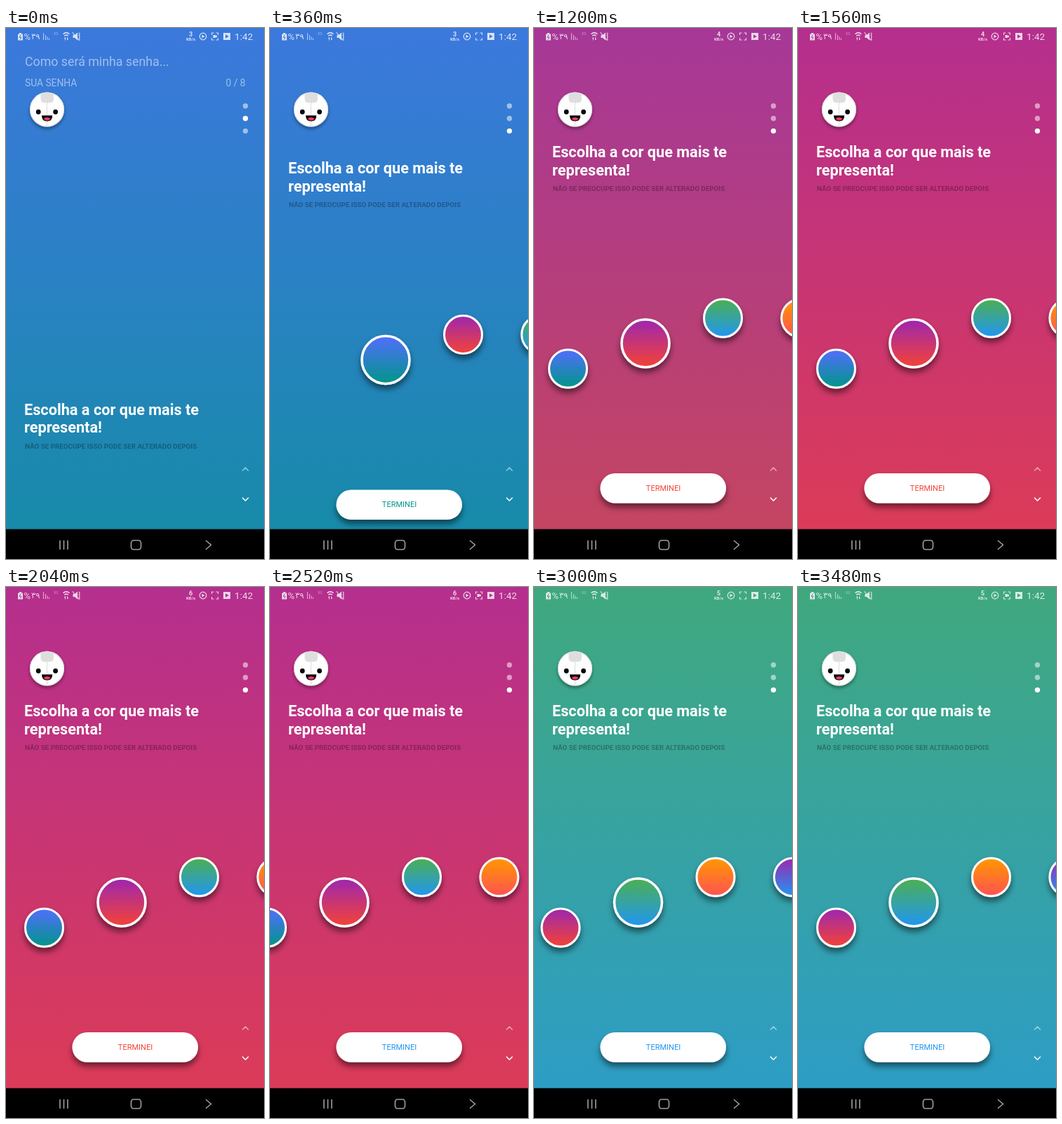
These frames come from a looping animation (368x756 px, 3600 ms). An HTML page:

```html
<!DOCTYPE html>
<html lang="pt-BR">
<head>
<meta charset="utf-8">
<title>Escolha de cor</title>
<style>
  html, body { margin: 0; width: 100%; height: 100%; overflow: hidden; background: #000; }
  svg { display: block; width: 368px; height: 756px; font-family: Roboto, "Noto Sans", sans-serif; }
  .title { font-size: 21.7px; font-weight: 700; }
  .note { font-size: 9.8px; font-weight: 700; fill: #000; fill-opacity: .3; }
  .line { fill: none; stroke-linecap: round; stroke-linejoin: round; }
</style>
</head>
<body>
<svg viewBox="0 0 368 756" fill="#fff">
  <defs id="defs">
    <filter id="shadow" filterUnits="userSpaceOnUse" x="-150" y="0" width="800" height="1200">
      <feDropShadow dx="0" dy="6" stdDeviation="4.2" flood-color="#000" flood-opacity=".5"/>
    </filter>
    <filter id="softShadow" x="-30%" y="-30%" width="160%" height="170%">
      <feDropShadow dx="0" dy="3" stdDeviation="2.6" flood-color="#000" flood-opacity=".4"/>
    </filter>
  </defs>

  <g id="backdrops"></g>

  <g id="page">
    <g transform="translate(0 -366.5)" fill-opacity=".52">
      <text x="27" y="54" font-size="17.8">Como será minha senha...</text>
      <g font-size="13.8">
        <text x="27" y="83">SUA SENHA</text>
        <text x="341.5" y="83" text-anchor="end">0 / 8</text>
      </g>
    </g>
    <text class="title" x="26" y="184">Escolha a cor que mais te</text>
    <text class="title" x="26" y="209.5">representa!</text>
    <text class="note" x="27" y="232">NÃO SE PREOCUPE ISSO PODE SER ALTERADO DEPOIS</text>
    <g id="swatches" filter="url(#shadow)" stroke="#fff"></g>
    <rect x="94.5" y="634" width="179.5" height="42.5" rx="21.25" filter="url(#shadow)"/>
    <text id="button" x="184.5" y="659" font-size="11" text-anchor="middle">TERMINEI</text>
  </g>

  <!-- avatar -->
  <g>
    <circle cx="58.5" cy="116" r="24.5" filter="url(#softShadow)"/>
    <circle cx="58.5" cy="116" r="23.8" fill="none" stroke="#e4e4e4" stroke-width="1.2"/>
    <path d="M58.5 93V139" stroke="#ddd" stroke-width="1"/>
    <path d="M49.5 94.5Q58.5 89.5 68 94.5V101Q68 106.5 62.5 106.5H55Q49.5 106.5 49.5 101Z" fill="#dedede"/>
    <g fill="#050505">
      <circle cx="46.2" cy="119.5" r="3.4"/>
      <circle cx="70.6" cy="119.5" r="3.4"/>
      <path d="M51 124.5H66.2Q66.2 132.8 58.6 132.8Q51 132.8 51 124.5Z"/>
    </g>
    <path d="M53.5 129Q58.6 125.6 63.8 129Q62.2 131.7 58.6 131.7Q55 131.7 53.5 129Z" fill="#f0386b"/>
  </g>

  <g id="dots"></g>
  <g class="line" stroke="#fff" stroke-width="1.6" stroke-linecap="square">
    <path d="M337.5 630L341.5 626L345.5 630" opacity=".52"/>
    <path d="M337.5 669L341.5 673L345.5 669"/>
  </g>

  <!-- status bar -->
  <g opacity=".8">
    <path d="M17 8.5H19V7H22V8.5H24V17.5H17Z"/>
    <path d="M21 10L19 13.3H22L20.3 16" class="line" stroke="#666f99" stroke-width="1"/>
    <text x="25.5" y="16.5" font-size="13">%</text>
    <text x="36" y="16" font-size="11.5" font-family="DejaVu Sans, sans-serif" direction="ltr">٣٩</text>
    <path d="M53.5 7V17M56.5 10V17M59 12.5V17M61.5 14.5V17" stroke="#fff" stroke-width="1.1" opacity=".75"/>
    <text x="67.5" y="10" font-size="6" opacity=".55">3G</text>
    <g class="line" stroke="#fff" stroke-width="1.5">
      <path d="M82 8.3Q86 5 90 8.3M83.7 10.8Q86 9 88.3 10.8"/>
      <path d="M84.5 17V13.5L83.4 14.8M87.5 13.5V17L88.6 15.7" stroke-width="1"/>
    </g>
    <path d="M95.5 10H98L102 6.5V17.5L98 14H95.5Z"/>
    <path d="M95 6.5L104 17.5M104 7L105.3 9L104 11L105.3 13L104 15L105.3 17" class="line" stroke="#fff" stroke-width="1.1"/>
    <g text-anchor="middle" font-weight="700">
      <text id="speed" x="263.5" y="11.8" font-size="9"></text>
      <text x="263.5" y="17.8" font-size="6">KB/s</text>
    </g>
    <circle cx="281" cy="12" r="4.8" class="line" stroke="#fff" stroke-width="1.2"/>
    <path d="M279.5 9.5L283.5 12L279.5 14.5Z"/>
    <path d="M293.5 9.5V7H296M300 7H302.5V9.5M302.5 14.5V17H300M296 17H293.5V14.5" class="line" stroke="#fff" stroke-width="1.1"/>
    <path id="camera" d="M295.5 10H299V11.3L301 10.2V13.8L299 12.7V14H295.5Z"/>
    <path fill-rule="evenodd" d="M310 7H320V17H310ZM313 9.3V14.7L317.8 12Z"/>
    <text x="326" y="17" font-size="13.6">1:42</text>
  </g>

  <!-- navigation bar -->
  <rect y="713.5" width="368" height="43" fill="#000"/>
  <g class="line" stroke="#a0a0a0" stroke-width="1.6">
    <path d="M77 730V742M82.5 730V742M88 730V742"/>
    <rect x="178.5" y="729.5" width="14" height="13" rx="3.5"/>
    <path d="M285.5 730L292.5 736L285.5 742"/>
  </g>
</svg>

<script>
const LOOP = 3600, STEP = 120;
const SPACING = 110.5, CENTER = 165;
const FIRST_PICK = 1000, SECOND_PICK = 2520;
const themes = [
  ['#536dfe', '#009688'], ['#9c27b0', '#f44336'], ['#4caf50', '#2196f3'],
  ['#ff9800', '#ff5252'], ['#9c27b0', '#2196f3']
];
// [time, carousel offset]: each swipe overshoots and settles back
const swipe = [
  [690, 0], [840, -20], [960, -55], [1080, -108], [1200, -116.5], [1320, -112], [1440, -110.5],
  [2360, -110.5], [2400, -113], [2520, -169.5], [2640, -222], [2760, -247], [2880, -248],
  [3000, -237.5], [3120, -228], [3240, -222.5], [3360, -221]
];

const byId = id => document.getElementById(id);
const clamp = (v, lo, hi) => Math.min(hi, Math.max(lo, v));
const progress = (t, start, length) => clamp((t - start) / length, 0, 1);
const easeOut = (x, power = 2) => 1 - (1 - x) ** power;

function add(parent, tag, attrs) {
  const el = document.createElementNS('http://www.w3.org/2000/svg', tag);
  set(el, attrs);
  return parent.appendChild(el);
}

function set(el, attrs) {
  for (const name in attrs) el.setAttribute(name, attrs[name]);
}

function follow(track, t) {
  const next = track.findIndex(([time]) => time > t);
  if (next < 0) return track[track.length - 1][1];
  if (next === 0) return track[0][1];
  const [t0, v0] = track[next - 1], [t1, v1] = track[next];
  return v0 + (v1 - v0) * (t - t0) / (t1 - t0);
}

function addGradient(id, colors, box) {
  const gradient = add(byId('defs'), 'linearGradient', { id, x1: 0, x2: 0, y1: 0, y2: 1, ...box });
  colors.forEach((color, i) => add(gradient, 'stop', { offset: i, 'stop-color': color }));
}

const tall = { gradientUnits: 'userSpaceOnUse', y1: -454, y2: 1167 };
const swatches = themes.map((colors, i) => {
  addGradient('swatch' + i, colors);
  return add(byId('swatches'), 'circle', { fill: `url(#swatch${i})` });
});
const backdrops = themes.slice(0, 3).map((colors, i) => {
  addGradient('backdrop' + i, colors, tall);
  return add(byId('backdrops'), 'rect', { width: 368, height: 756, fill: `url(#backdrop${i})` });
});
const dots = [111, 128.7, 146.6].map(cy => add(byId('dots'), 'circle', { cx: 341.5, cy, r: 3.7 }));

function render(t) {
  const scroll = 366.5 * (1 - easeOut(progress(t, 0, 600), 3));
  set(byId('page'), { transform: `translate(0 ${scroll})` });
  const section = scroll > 356 ? 1 : 2;
  dots.forEach((dot, i) => set(dot, { opacity: i === section ? 1 : .52 }));

  const offset = follow(swipe, t);
  const active = easeOut(progress(t, FIRST_PICK, 190)) + easeOut(progress(t, SECOND_PICK, 190));
  swatches.forEach((swatch, i) => {
    const place = clamp(i - active, -1, 1);
    const focus = 1 - Math.abs(place);
    const border = 3 + .5 * focus;
    set(swatch, {
      cx: CENTER + i * SPACING + offset,
      cy: 449 - 36 * place,
      r: 28.5 + 7.2 * focus - border / 2,
      'stroke-width': border
    });
  });

  set(backdrops[1], { opacity: easeOut(progress(t, FIRST_PICK, 305)) });
  set(backdrops[2], { opacity: easeOut(progress(t, SECOND_PICK, 305)) });
  const picked = t < FIRST_PICK ? 0 : t < SECOND_PICK ? 1 : 2;
  set(byId('button'), { fill: themes[picked][1] });

  byId('speed').textContent = [3, 4, 6, 5][Math.floor((t + 100) / 1000)];
  const cameraOn = t < STEP || (t + 50) % 1000 >= 500;
  set(byId('camera'), { opacity: cameraOn ? 1 : 0 });
}

const start = performance.now();
function tick() {
  const t = (performance.now() - start) % LOOP;
  render(Math.floor(t / STEP) * STEP);
  requestAnimationFrame(tick);
}
tick();
</script>
</body>
</html>
```
